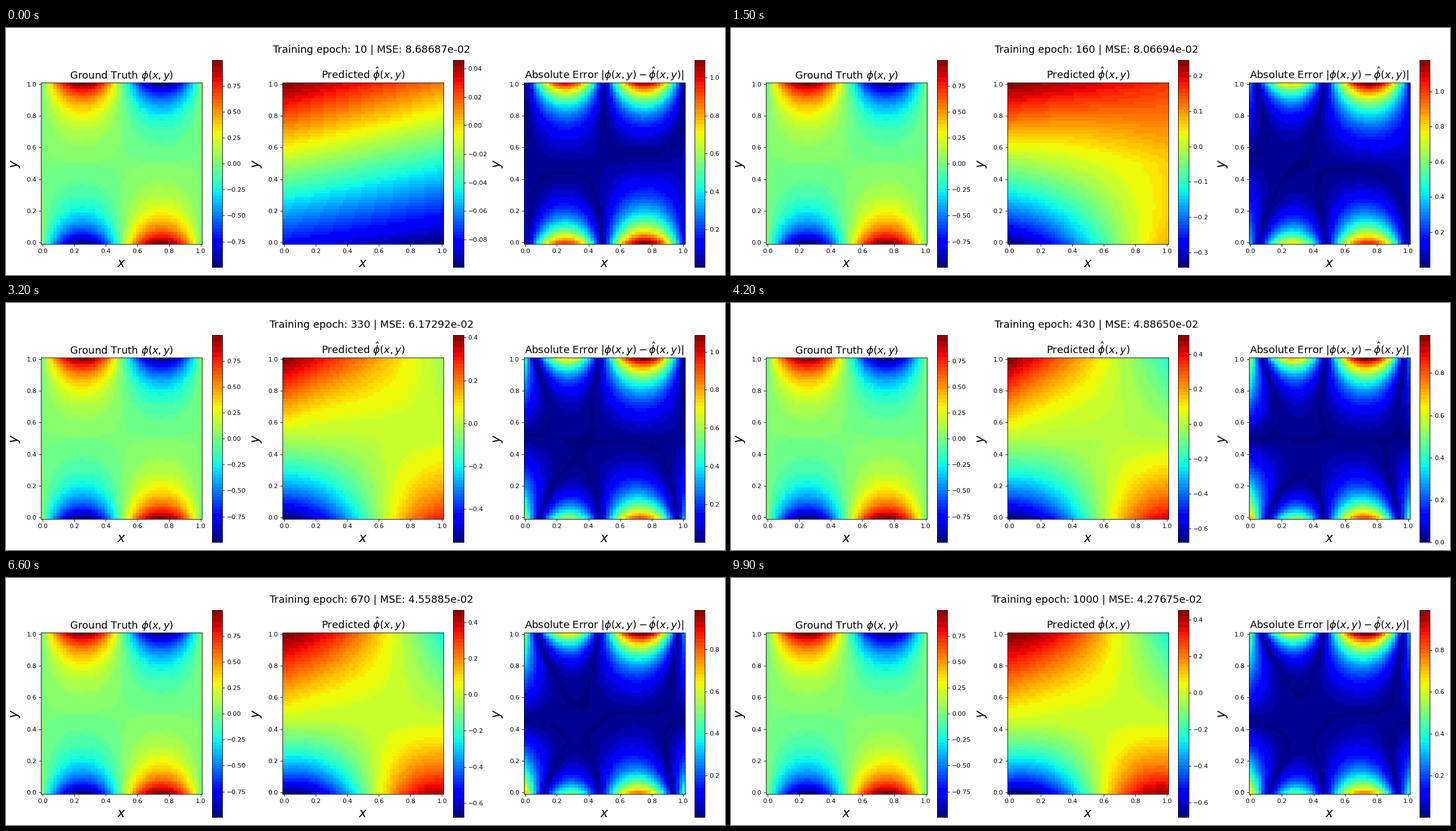
These frames come from a looping animation (1277x439 px, 10 s). A matplotlib script:

```python
import numpy as np
import matplotlib.pyplot as plt
from matplotlib.animation import FuncAnimation
from matplotlib.colors import ListedColormap

W, H, DPI = 1277, 439, 64
PT = 72 / DPI  # points per pixel
FRAMES, INTERVAL = 100, 100
TEXT = 18.1 * PT

plt.rcParams.update({
    "font.family": "DejaVu Sans",
    "font.size": 11.3 * PT,
    "axes.linewidth": 0.9 * PT,
    "axes.titlesize": TEXT,
    "axes.titlepad": 6.8 * PT,
    "axes.labelsize": 22.5 * PT,
})
for axis in ("xtick", "ytick"):
    plt.rcParams.update({
        f"{axis}.major.size": 3.95 * PT,
        f"{axis}.major.pad": 3.95 * PT,
        f"{axis}.major.width": 0.9 * PT,
    })

LOSS_EPOCHS = [10, 70, 250, 430, 670, 870, 1000]
LOSS = [.0868687, .0893181, .0720206, .0488650, .0455885, .0438265, .0427675]

GRID = np.linspace(0, 1, 51)
X, Y = np.meshgrid(GRID, GRID)
TRUTH = (np.sin(2 * np.pi * X) * np.sinh(2 * np.pi * (Y - 0.5))
         / np.sinh(np.pi))


def lerp(a, b, t):
    return a + (b - a) * t


def progress(epoch, start, end):
    return np.clip((epoch - start) / (end - start), 0, 1)


def bilinear(top_left, top_right, low_left, low_right):
    return lerp(lerp(low_left, low_right, X), lerp(top_left, top_right, X), Y)


def saddle(grow, drift):
    """Opposed waves on the top and bottom edges, fading to a middle line."""
    level = lerp(0.50, 0.445, drift)
    top = lerp(0.51, 0.45, drift) * lerp(
        1 - lerp(0.7, 1.4, grow) * X, np.cos(2.15 * X), drift)
    k = lerp(3.0, 3.6, drift)
    bottom = -0.13 - 0.55 * np.cos(k * (X - 0.08 * drift))

    above = np.clip((Y - level) / (1 - level), 0, 1)
    below = np.clip(level - Y, 0, 1)
    return (top * above ** (1 + 0.5 * np.sin(np.pi * X))
            + bottom * np.sinh(k * below) / np.sinh(k * level))


def predict(epoch):
    """A tilted plane that turns over, then bends into a saddle."""
    plane = lerp(bilinear(0.046, 0.013, -0.081, -0.0995),
                 bilinear(0.156, 0.190, -0.229, -0.036),
                 progress(epoch, 10, 70))
    grow = progress(epoch, 70, 430)
    drift = 1 - np.exp(-max(epoch - 430, 0) / 200)
    return lerp(plane, saddle(grow, drift), grow)


def banded_jet():
    """Jet with neighbouring shades merged into coarse RGB steps."""
    lut = np.floor(plt.get_cmap("jet")(np.arange(256))[:, :3] * 255)
    _, group = np.unique(lut // [32, 16, 32], axis=0, return_inverse=True)
    group = group.ravel()
    return ListedColormap([lut[group == g].mean(axis=0) / 255 for g in group])


fig = plt.figure(figsize=(W / DPI, H / DPI), dpi=DPI, facecolor="white")
CMAP = banded_jet()


def add_axes(left, top, width, height):
    return fig.add_axes([left / W, 1 - (top + height) / H,
                         width / W, height / H])


class Panel:
    def __init__(self, column, title):
        left = 62.4 + 428.6 * column
        ax = add_axes(left, 97.1, 286, 286.7)
        self.image = ax.imshow(
            np.zeros_like(TRUTH), cmap=CMAP, origin="lower", aspect="auto",
            interpolation="nearest", extent=(-0.01, 1.01, -0.01, 1.01))
        ax.set_title(title)
        ax.set_xlabel("$x$", labelpad=5.5 * PT)
        ax.set_ylabel("$y$", labelpad=8.5 * PT)

        self.cax = add_axes(left + 303.4, 56.8, 18.4, 368.6)
        self.bar = self.cax.imshow(
            np.arange(256)[:, None], cmap=CMAP, origin="lower",
            aspect="auto", interpolation="nearest")
        self.cax.set_xticks([])
        self.cax.yaxis.tick_right()

    def show(self, field):
        low, high = field.min(), field.max()
        self.image.set_data(field)
        self.image.set_clim(low, high)
        self.bar.set_extent((0, 1, low, high))
        self.cax.set_ylim(low, high)


truth = Panel(0, r"Ground Truth $\phi(x,y)$")
guess = Panel(1, r"Predicted $\hat{\phi}(x,y)$")
error = Panel(2, r"Absolute Error $|\phi(x,y)-\hat{\phi}(x,y)|$")
truth.show(TRUTH)
heading = fig.text(649.4 / W, 1 - 43.5 / H, "", fontsize=TEXT,
                   ha="center", va="baseline")


def update(i):
    epoch = 10 * (i + 1)
    pred = predict(epoch)
    guess.show(pred)
    error.show(np.abs(TRUTH - pred))
    mse = np.interp(epoch, LOSS_EPOCHS, LOSS)
    heading.set_text(f"Training epoch: {epoch} | MSE: {mse:.5e}")
    return []


anim = FuncAnimation(fig, update, frames=FRAMES, interval=INTERVAL,
                     init_func=lambda: update(0), repeat=True)
plt.show()
```
